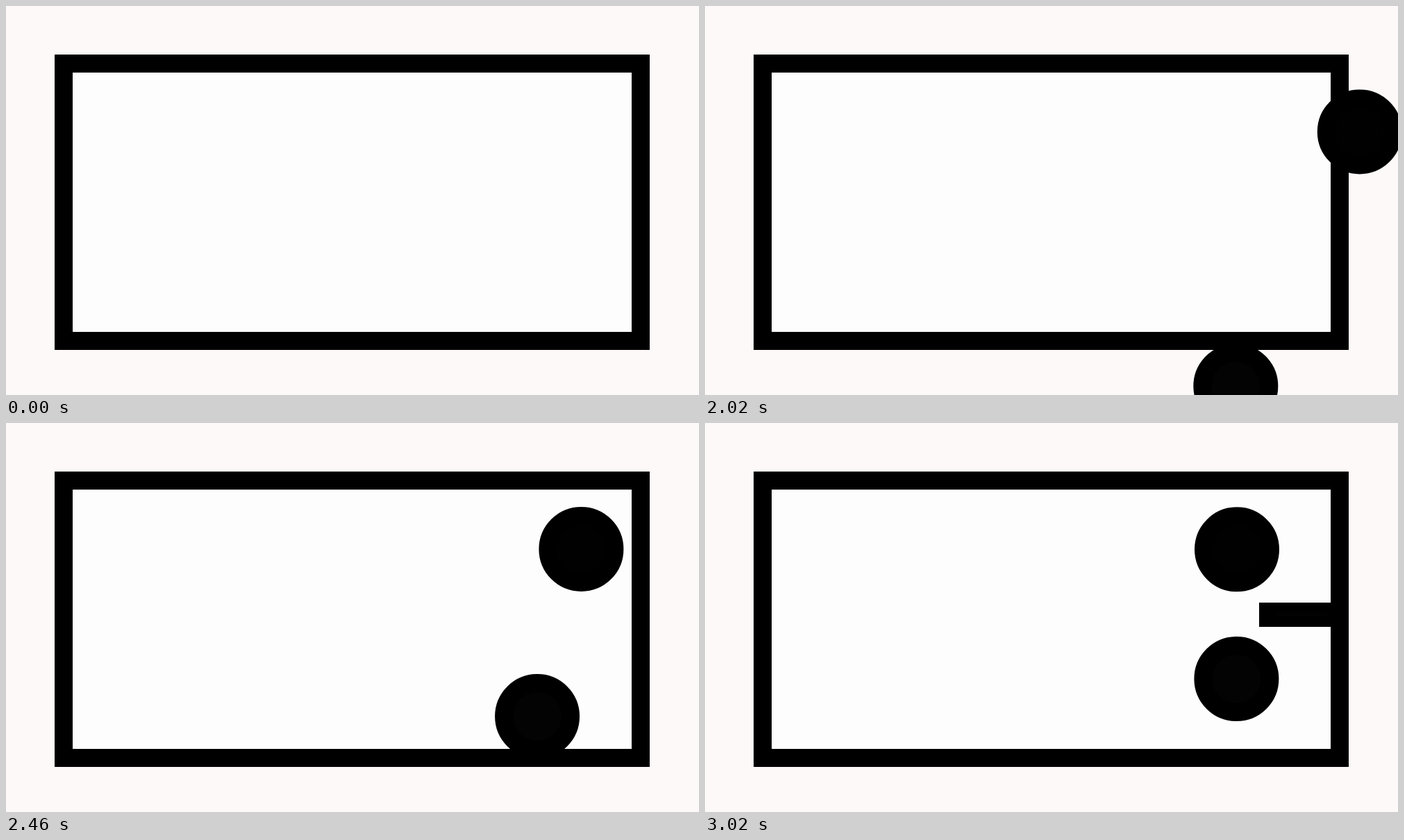
Recreate the animation shown at these times as an HTML page. Size 998 px wide and 561 px high, loop 3.2 s.

```html
<!DOCTYPE html>
<html lang="en">
<head>
<meta charset="utf-8">
<title>Shapes sliding into a frame</title>
<style>
html, body { margin: 0; width: 100%; height: 100%; overflow: hidden; background: #fdf9f8; }
svg { display: block; width: 100%; height: 100%; }
</style>
</head>
<body>
<svg viewBox="0 0 998 561">
  <rect x="83" y="83" width="831" height="400" fill="#fefdfd" stroke="#000" stroke-width="26"/>
  <g id="bar">
    <rect y="259" width="124" height="35"/>
    <rect x="26" y="273" width="72" height="6" fill="#020202"/>
  </g>
  <circle id="upper" r="48" fill="#010101" stroke="#000" stroke-width="26"/>
  <circle id="lower" r="48" fill="#030303" stroke="#000" stroke-width="26"/>
</svg>
<script>
const LOOP = 3200, STEP = 20;
const [bar, upper, lower] = ["bar", "upper", "lower"].map(id => document.getElementById(id));
const [barBody, barCore] = bar.children;
const start = performance.now();

const place = (el, x, y) => el.setAttribute("transform", `translate(${x} ${y})`);
const left = (t, end) => Math.max(0, end - t);

function draw(now) {
  const time = Math.max(0, now - start) % LOOP;
  const t = Math.floor(time / STEP) * STEP;

  // Both discs travel at constant speed, with a very slight sideways drift.
  const a = left(t, 2700), b = left(t, 2650);
  place(upper, 766 + 0.26 * a, 182.3 - 0.0013 * a);
  place(lower, 765.4 - 0.0017 * b, 369 + 0.2845 * b);

  // The bar grows leftwards out of the right wall.
  const x = Math.min(922, 798 + 0.78 * left(t, 3020));
  place(bar, x, 0);
  barBody.setAttribute("width", 922 - x);
  barCore.setAttribute("width", Math.max(0, 870 - x));

  requestAnimationFrame(draw);
}
draw(start);
</script>
</body>
</html>
```
